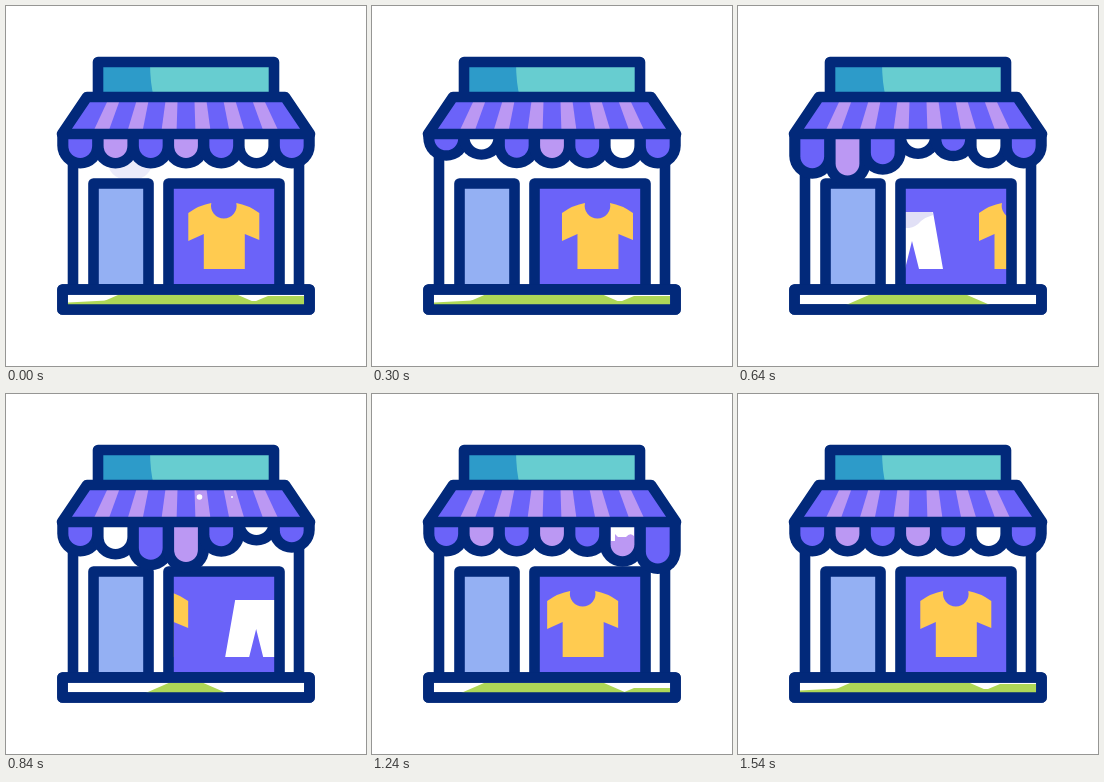
These frames come from a looping animation (360x360 px, 1.96 s). An HTML page:

```html
<!DOCTYPE html>
<html lang="en">
<head>
<meta charset="utf-8">
<title>Shop</title>
<style>
html, body { margin: 0; width: 100%; height: 100%; overflow: hidden; background: #fff; }
svg { display: block; width: 100vw; height: 100vh; }
.ink { stroke: #02297a; stroke-width: 10.6; stroke-linejoin: round; stroke-linecap: round; }
</style>
</head>
<body>
<svg viewBox="0 0 360 360">
  <defs>
    <clipPath id="pane"><rect x="167" y="182" width="102" height="97"/></clipPath>
  </defs>
  <ellipse data-from="0" data-to="20" cx="124" cy="160" rx="21" ry="14" fill="#ebebfa"/>
  <path class="ink" d="M67 132V284M293 132V284" fill="none"/>
  <rect class="ink" x="87.5" y="177.5" width="55" height="106" fill="#94b0f3"/>
  <rect x="162.5" y="177.5" width="111" height="106" fill="#6b63f9"/>
  <g clip-path="url(#pane)">
    <path class="shirt" fill="#ffcb50"/>
    <path class="shirt" fill="#ffcb50"/>
    <g id="pants">
      <path d="M-21 206H21L31 263H7L0 235L-7 263H-31Z" fill="#fff"/>
      <path data-from="0" data-to="740" d="M-21 206H20.5L21 209Q14 211 9 215Q4 221 -3 222H-23Z" fill="#e1e0f6"/>
    </g>
  </g>
  <rect class="ink" x="162.5" y="177.5" width="111" height="106" fill="none"/>
  <rect class="ink" x="56.5" y="283.5" width="247" height="20" fill="#fff"/>
  <g fill="#aed757">
    <path id="hump"/>
    <path id="verge" d="M62 299V296.5L110 294L232 295H250L262 290H298V299Z"/>
  </g>
  <rect class="ink" x="56.5" y="283.5" width="247" height="20" fill="none"/>
  <rect x="92" y="56" width="176" height="36" fill="#67cdd0"/>
  <path d="M92 56H144Q144 77 148 92H92Z" fill="#2d9bc9"/>
  <rect class="ink" x="92" y="56" width="176" height="36" fill="none"/>
  <path d="M81 91H279L304 128H56Z" fill="#6b63f9"/>
  <g id="stripes" fill="#bb98f3"></g>
  <g data-from="780" data-to="920" fill="#fff"><circle cx="193.5" cy="103" r="2.8"/><circle cx="226" cy="103" r="1"/></g>
  <g id="rims" fill="#02297a"></g>
  <g id="flaps"></g>
  <path data-from="940" data-to="1080" d="M105 140Q109 138 113 139Q109 143 105 140Z" fill="#fff"/>
  <path data-from="1180" data-to="1400" d="M239 133H262V142Q258 138 254 143H246L243 140V147H239Z" fill="#fff"/>
  <path class="ink" d="M81 91H279L304 128H56Z" fill="none"/>
</svg>
<script>
const LOOP = 1960, RUN = 1540, STEP = 120;
const PITCH = 35.25, GAP = 103, HOME = 218.3;
const PURPLE = '#6b63f9', LILAC = '#bb98f3', WHITE = '#fff';

const el = id => document.getElementById(id);
const all = q => [...document.querySelectorAll(q)];
const within = (t, a, b) => t >= a && t < b;
const shift = (node, x, y = 0) =>
  node.setAttribute('transform', `translate(${x.toFixed(2)} ${y.toFixed(2)})`);

const hermite = s => s * s * (3 - 2 * s);
const smooth = (t, a, b) => hermite(Math.min(1, Math.max(0, (t - a) / (b - a))));

// cubic-bezier(.67, 0, .31, 1), solved by bisection
function ease(x) {
  let lo = 0, hi = 1;
  for (let i = 0; i < 20; i++) {
    const s = (lo + hi) / 2, w = 1 - s;
    if (2.01 * s * w * w + 0.93 * s * s * w + s * s * s < x) lo = s; else hi = s;
  }
  return hermite(lo);
}

// a flap draws up, drops to its lowest at 0, then settles
const swing = t =>
  -11 * smooth(t, -480, -280) + 28.5 * smooth(t, -280, 0) - 17.5 * smooth(t, 0, 270);

// a strip with a round lower end
const tongue = (x, r, top, low) =>
  `M${x - r} ${top}H${x + r}V${low - r}A${r} ${r} 0 0 1 ${x - r} ${low - r}Z`;

function make(parent, d = '') {
  const p = document.createElementNS('http://www.w3.org/2000/svg', 'path');
  p.setAttribute('d', d);
  return el(parent).appendChild(p);
}

for (let i = -2.5; i < 3; i++) {
  const a = 180 + i * 29, b = 180 + i * 33.8;
  make('stripes', `M${a - 6} 95H${a + 6}L${b + 7.5} 124H${b - 7.5}Z`);
}
const flaps = Array.from({ length: 7 }, (_, i) => ({
  x: 180 + (i - 3) * PITCH, rim: make('rims'), cloth: make('flaps')
}));

const shirts = all('.shirt'), blinks = all('[data-from]');
shirts.forEach(s => s.setAttribute('d',
  'M-36 207Q-25 199 -13 197A12.8 12.8 0 1 0 12 197Q24 199 35 207V234L20.5 228V263H-20.5V228L-36 235Z'));

function tint(i, t) {
  if (i % 2 === 0) return PURPLE;
  const pale = i === 5 ? !within(t, -20, 280) : within(t, -400, -200) || within(t, 160, 260);
  return pale ? WHITE : LILAC;
}

function drawFlap(f, i, time) {
  const t = time - 520 - STEP * i, low = 152 + swing(t);
  f.rim.setAttribute('d', tongue(f.x, 23, 128, Math.max(low + 10.5, 151)));
  f.cloth.setAttribute('d', tongue(f.x, 11.9, 133, low));
  f.cloth.setAttribute('fill', tint(i, t));
}

// the lawn's middle narrows to nothing, then spreads again
function drawLawn(t) {
  const shrink = 1 - Math.min(1, t / 960) ** 5;
  const half = 83 * (shrink + smooth(t, 1060, 1230));
  const top = Math.max(0, half - 23), mid = 180 - 8 * smooth(half, 75, 83);
  el('hump').setAttribute('d', half < 1 ? '' :
    `M${mid - half} 299L${mid - top} 289H${mid + top}L${mid + half} 299Z`);
  shift(el('verge'), 0, 9 * (smooth(t, 300, 500) - smooth(t, 1060, 1400)));
}

function draw(t) {
  const x = HOME + 2 * GAP * ease(Math.min(1, t / RUN));
  shift(shirts[0], x);
  shift(el('pants'), x - GAP);
  shift(shirts[1], x - 2 * GAP);
  flaps.forEach((f, i) => drawFlap(f, i, t));
  drawLawn(t);
  for (const b of blinks) {
    const on = within(t, +b.dataset.from, +b.dataset.to);
    b.setAttribute('visibility', on ? 'visible' : 'hidden');
  }
}

function tick() {
  const t = performance.now() % LOOP;
  draw(Math.floor(t / 20) * 20);
  requestAnimationFrame(tick);
}
tick();
</script>
</body>
</html>
```
